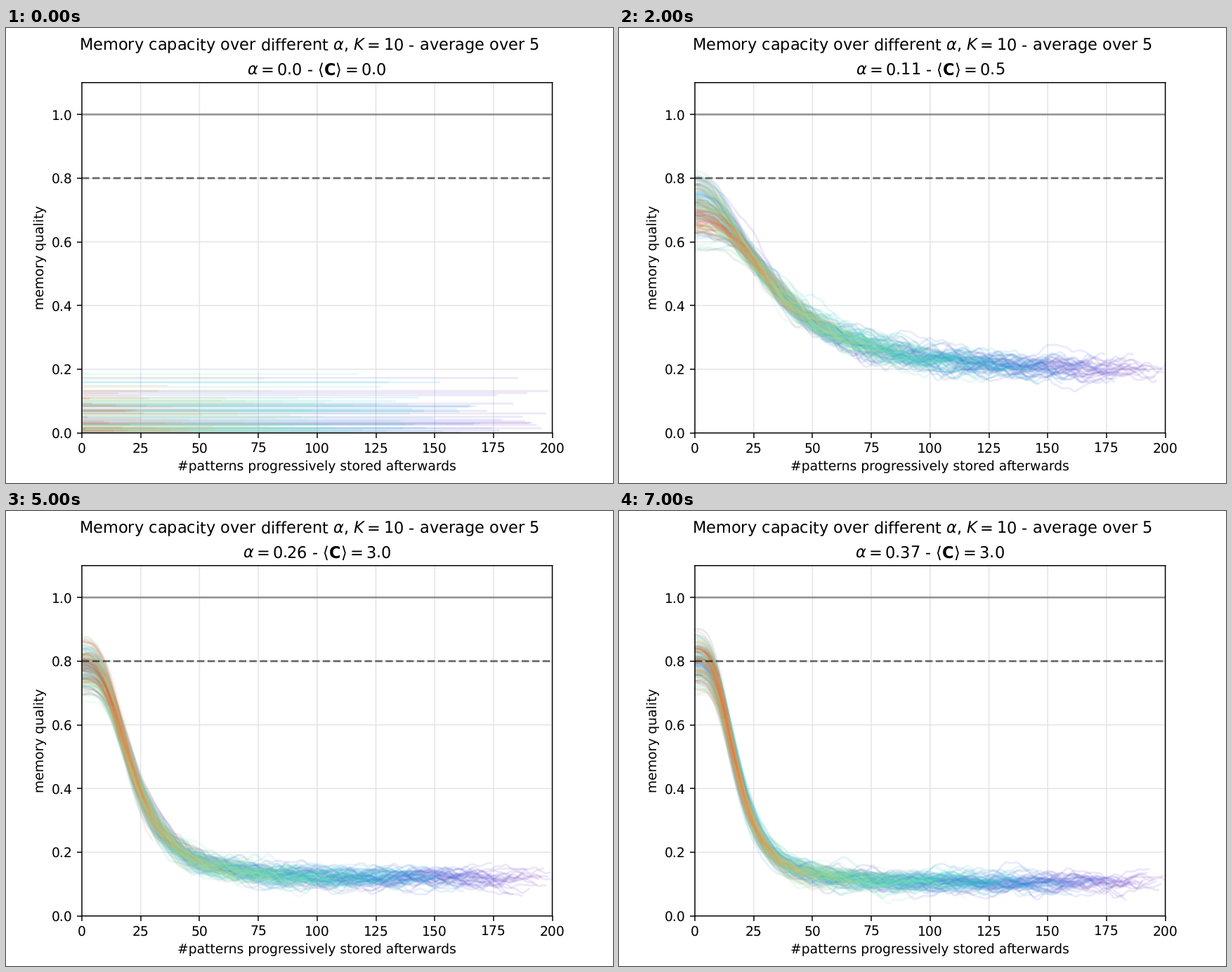
A matplotlib script that plays this animation: 864 by 648 pixels, repeating every 8000 ms.

```python
import numpy as np
import matplotlib.pyplot as plt
from matplotlib.animation import FuncAnimation
from matplotlib.collections import LineCollection

plt.rcParams.update({"text.hinting": "none", "path.snap": False})

N = 200                    # stored patterns, one line each
AGE = np.arange(N + 1)
ALPHA_STEP = 1 / 19
CAPACITY = [0.0, 0.2, 0.5, 1.4, 2.2, 3.0, 3.0, 3.0]


def fade(alpha, scale):
    return np.exp(-alpha / scale)


def mean_quality(alpha, age):
    """Sigmoid forgetting curve, steeper and earlier for larger alpha."""
    start = 0.81 - 0.29 * fade(alpha, 0.11)
    floor = 0.095 + 0.23 * fade(alpha, 0.11)
    half = 10.5 * alpha ** -0.55
    power = 3.5 - 2.3 * fade(alpha, 0.19)
    return floor + (start - floor) / (1 + (age / half) ** power)


def wander(rng, width):
    """Smoothed noise of unit variance."""
    reach = int(3 * width)
    kernel = np.exp(-0.5 * (np.arange(-reach, reach + 1) / width) ** 2)
    kernel /= np.sqrt((kernel ** 2).sum())
    return np.convolve(rng.normal(size=N + 1 + 2 * reach), kernel, "valid")


def flat_lines():
    """Without learning each pattern keeps a random level; many fall below zero."""
    rng = np.random.default_rng(4)
    levels = np.clip(rng.normal(0.015, 0.07, N), -1, 0.187)
    return [np.array([[0, y], [N - i, y]]) for i, y in enumerate(levels)]


def decay_lines(alpha, seed):
    rng = np.random.default_rng(seed)
    start_sd = 0.042 + 0.05 * fade(alpha, 0.06)
    tail_sd = 0.017 + 0.012 * fade(alpha, 0.1)
    settle = 0.35 + 0.65 * np.clip(AGE / 45, 0, 1)
    # The first patterns meet an empty memory: a head start, then a dip.
    head = (0.58 * fade(alpha, 0.06)
            * (np.exp(-(AGE / 24) ** 2.5) - 0.3 * np.exp(-((AGE - 52) / 18) ** 2)))
    lines = []
    for i in range(N):
        stretch = 1 + 0.04 * np.clip(rng.normal(), -2, 2)
        offset = start_sd * np.clip(rng.normal(), -2.5, 2.2) * (1 - np.exp(-i / 6))
        noise = 0.92 * wander(rng, 6) + 0.3 * wander(rng, 1.2)
        y = (mean_quality(alpha, AGE * stretch)
             + offset * np.exp(-(AGE / 18) ** 2)
             + head * np.exp(-i / 8)
             + tail_sd * settle * noise)
        lines.append(np.column_stack([AGE, y])[:N - i + 1])
    return lines


def line_colors():
    rgba = plt.get_cmap("rainbow")(np.linspace(0, 0.97, N))
    grey = 0.15 + 0.4 * np.exp(-np.arange(N) / 15)[:, None]
    rgba[:, :3] = rgba[:, :3] * (1 - grey) + 0.45 * grey
    rgba[:, 3] = 0.12
    return rgba


fig, ax = plt.subplots(figsize=(6.4, 4.8), dpi=135)
fig.suptitle(r"Memory capacity over different $\alpha$, $K = 10$ - average over 5")
ax.set_xlim(0, N)
ax.set_ylim(0, 1.1)
ax.set_xticks(range(0, N + 1, 25))
ax.set_yticks(np.arange(0, 1.01, 0.2))
ax.set_xlabel("#patterns progressively stored afterwards")
ax.set_ylabel("memory quality")
ax.grid(True, color=(0.89, 0.89, 0.92), lw=0.8)
ax.axhline(1.0, color="black", alpha=0.37, lw=1.5, zorder=3)
ax.axhline(0.8, color="black", alpha=0.55, lw=1.5, ls="--", zorder=3)

curves = LineCollection([], colors=line_colors(), linewidths=1.5,
                        capstyle="projecting", joinstyle="round", zorder=2)
ax.add_collection(curves, autolim=False)
title = ax.set_title("")

alphas = [k * ALPHA_STEP for k in range(len(CAPACITY))]
steps = [decay_lines(a, 20 + k) if a else flat_lines()
         for k, a in enumerate(alphas)]


def draw(k):
    curves.set_segments(steps[k])
    title.set_text(rf"$\alpha = {round(alphas[k], 2)}$ - "
                   rf"$\langle \mathbf{{C}} \rangle = {CAPACITY[k]}$")
    return curves, title


anim = FuncAnimation(fig, draw, frames=len(alphas), interval=1000,
                     repeat=True, repeat_delay=0, blit=False)
plt.show()
```
